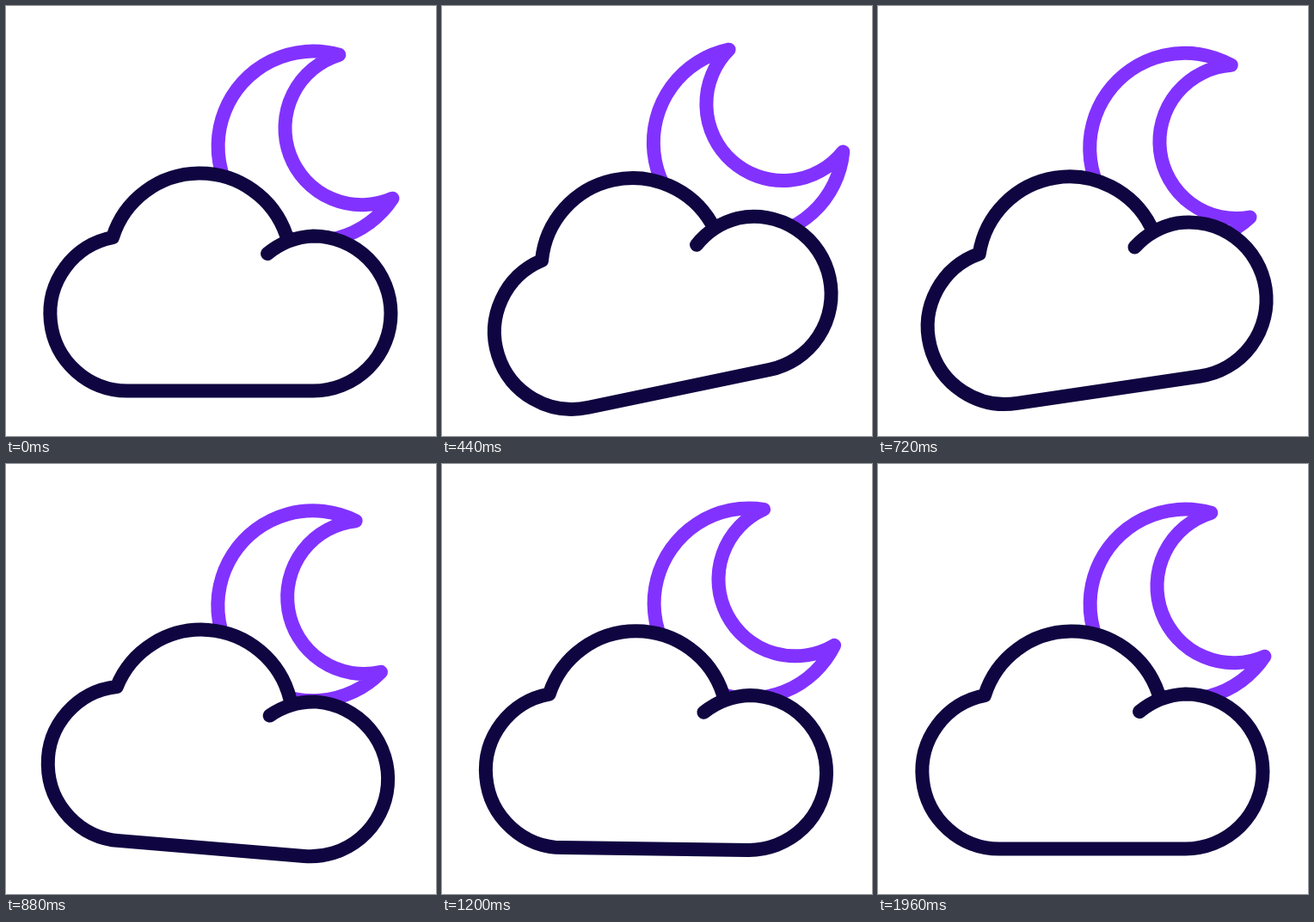
Recreate the animation shown at these times as an HTML page. Size 500 px wide and 500 px high, loop 2 s.

```html
<!DOCTYPE html>
<html lang="en">
<head>
<meta charset="utf-8">
<title>Cloudy night</title>
<style>
  html, body { margin: 0; width: 100%; height: 100%; overflow: hidden; background: #fff; }
  svg { display: block; width: 100%; height: 100%; }
  path { stroke-width: 16; stroke-linecap: round; stroke-linejoin: round; }
</style>
</head>
<body>
<svg viewBox="0 0 500 500">
  <path id="moon" fill="none" stroke="#8232ff"
    d="M387.3 56.8A110.5 110.5 0 1 0 449.5 223.7A89.2 89.2 0 1 1 387.3 56.8Z"/>
  <path id="cloud" fill="#fff" stroke="#0f0641"
    d="M304 288A90 90 0 0 1 357.5 267.5A90 90 0 0 1 357.5 447.5H142.5A90 90 0 0 1 124 269.2A106.2 106.2 0 0 1 326 266.8"/>
</svg>
<script>
  const LOOP = 2000;
  const STEP = 40;

  // Each swing reverses at its turning times (ms) and shrinks by the decay factor.
  const swings = [
    { id: "moon", pivot: "348 162.5", reach: -30, decay: 0.49,
      turns: [70, 390, 757, 1225, 1580, 1970] },
    { id: "cloud", pivot: "250 321.5", reach: -15, decay: 0.46,
      turns: [95, 588, 950, 1385, 1850] }
  ];

  const ease = u => u * u * (3 - 2 * u);

  function angleAt({ reach, decay, turns }, t) {
    const last = turns.length - 1;
    const peak = i => i === 0 || i === last ? 0 : reach * (-decay) ** (i - 1);
    const next = turns.findIndex(turn => t < turn);
    if (next < 1) return 0;
    const from = turns[next - 1];
    const u = (t - from) / (turns[next] - from);
    return peak(next - 1) + (peak(next) - peak(next - 1)) * ease(u);
  }

  function draw(t) {
    for (const swing of swings) {
      const angle = angleAt(swing, t).toFixed(3);
      document.getElementById(swing.id)
        .setAttribute("transform", `rotate(${angle} ${swing.pivot})`);
    }
  }

  const start = performance.now();

  function tick() {
    const t = (performance.now() - start) % LOOP;
    draw(Math.floor(t / STEP) * STEP);
    requestAnimationFrame(tick);
  }

  tick();
</script>
</body>
</html>
```
